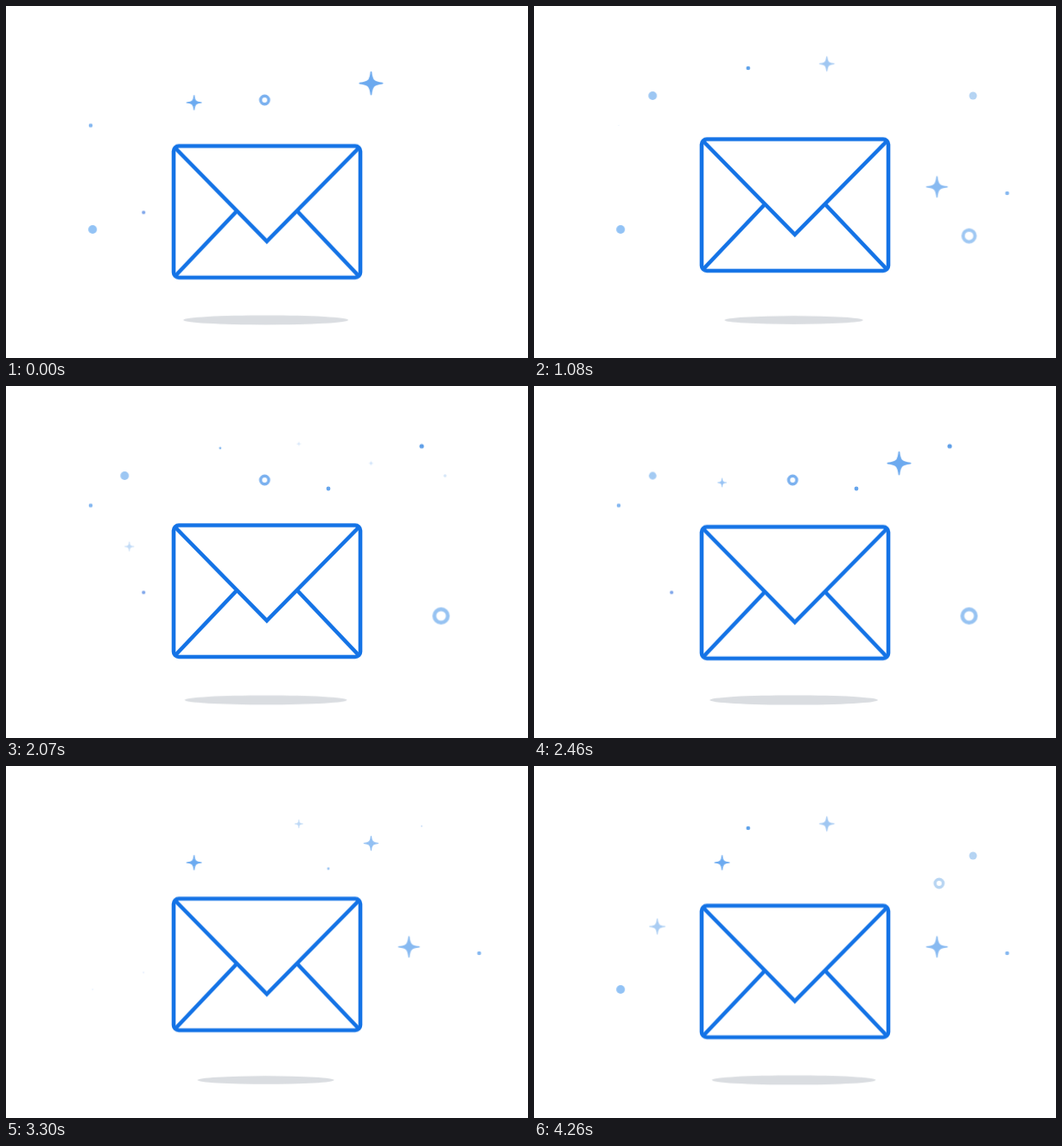
Animation of 604x408 px, one loop 4.29 s. Source, as an HTML page without scripts:

```html
<!DOCTYPE html>
<html lang="en">
<head>
<meta charset="utf-8">
<title>Floating envelope</title>
<style>
html, body { margin: 0; width: 100%; height: 100%; overflow: hidden; background: #fff; }
svg { display: block; width: 604px; height: 408px; }

/* Envelope and shadow share one bobbing rhythm */
.env, .shadow { animation: bob 1072.5ms cubic-bezier(.4, 0, .6, 1) -1903ms infinite alternate; }
.env { fill: none; stroke: #1473e6; stroke-width: 4.6; }
.shadow { animation-name: squeeze; fill: #dadde1; }
@keyframes bob { from { transform: translateY(.8px); } to { transform: translateY(-9.2px); } }
@keyframes squeeze { from { transform: scale(1); } to { transform: scale(.8, .84); } }

/* Sparkles: each pops in and out on its own schedule */
.p { animation: 4290ms linear infinite; fill: var(--c); }
.star { stroke: var(--c); stroke-width: .12; stroke-linejoin: round; }
.ring { fill: none; stroke: var(--c); }

@keyframes a { 0%, 18%, 37%, 68% { scale: 1; opacity: 1; } 27%, 30%, 76%, 100% { scale: 0; opacity: .3; } }
@keyframes b { 0%, 38%, 83%, 100% { scale: 1; opacity: 1; } 47%, 76% { scale: 0; opacity: .3; } }
@keyframes c { 0%, 10%, 43.5%, 72% { scale: 1; opacity: 1; } 17%, 39.5%, 79%, 100% { scale: 0; opacity: .3; } }
@keyframes d { 0%, 12%, 60%, 100% { scale: 1; opacity: 1; } 19%, 53.5% { scale: 0; opacity: .3; } }
@keyframes e { 0%, 14%, 37%, 68% { scale: 1; opacity: 1; } 21%, 30%, 75%, 100% { scale: 0; opacity: .3; } }
@keyframes f { 0%, 10%, 54%, 74% { scale: 1; opacity: 1; } 17%, 47%, 82%, 100% { scale: 0; opacity: .3; } }
@keyframes g { 0%, 12%, 52%, 92% { scale: 0; opacity: .3; } 18%, 46%, 98%, 100% { scale: 1; opacity: 1; } }
@keyframes h { 0%, 7%, 50%, 73% { scale: 0; opacity: .3; } 13%, 44%, 80%, 100% { scale: 1; opacity: 1; } }
@keyframes i { 0%, 7%, 65%, 100% { scale: 0; opacity: .3; } 13%, 56.5% { scale: 1; opacity: 1; } }
@keyframes j { 0%, 5%, 51%, 84.5% { scale: 0; opacity: .3; } 11%, 44%, 91%, 100% { scale: 1; opacity: 1; } }
@keyframes k { 0%, 13%, 36%, 60% { scale: 0; opacity: .3; } 19%, 29%, 68%, 100% { scale: 1; opacity: 1; } }
@keyframes m { 0%, 19%, 65.5%, 100% { scale: 0; opacity: .3; } 26%, 59% { scale: 1; opacity: 1; } }
@keyframes n { 0%, 28%, 79%, 100% { scale: 0; opacity: .3; } 35%, 72% { scale: 1; opacity: 1; } }
@keyframes o { 0%, 38.5%, 81%, 100% { scale: 0; opacity: .3; } 44.5%, 74% { scale: 1; opacity: 1; } }
@keyframes q { 0%, 32%, 52%, 91% { scale: 0; opacity: .3; } 38%, 46%, 97%, 100% { scale: 1; opacity: 1; } }
@keyframes r { 0%, 82% { scale: 0; opacity: .3; } 89%, 100% { scale: 1; opacity: 1; } }
</style>
</head>
<body>
<svg viewBox="0 0 604 408">
  <defs>
    <path id="star" d="M0-.95C.08-.22 .22-.08 .95 0C.22 .08 .08 .22 0 .95C-.08 .22-.22 .08-.95 0C-.22-.08-.08-.22 0-.95Z"/>
  </defs>

  <g transform="translate(300.6 364)"><ellipse class="shadow" rx="97.5" ry="5.6"/></g>

  <g class="env">
    <rect x="194" y="162.5" width="216" height="152.5" rx="6"/>
    <path d="M196 165L301.8 273L408 165M267 238L196 313M337 238L408 313"/>
  </g>

  <!-- dots -->
  <g transform="translate(98 138.5)"><circle class="p" r="2.3" style="--c:#86b8f0;animation-name:a"/></g>
  <g transform="translate(100.2 259)"><circle class="p" r="5" style="--c:#93c3f5;animation-name:b"/></g>
  <g transform="translate(159.2 239.3)"><circle class="p" r="2.1" style="--c:#7fa6ea;animation-name:c"/></g>
  <g transform="translate(247.8 72)"><circle class="p" r="2.3" style="--c:#5fa2ea;animation-name:g"/></g>
  <g transform="translate(137.3 104)"><circle class="p" r="4.9" style="--c:#9dc7f3;animation-name:i"/></g>
  <g transform="translate(508 104)"><circle class="p" r="4.5" style="--c:#b5d4f3;animation-name:j"/></g>
  <g transform="translate(547.5 217)"><circle class="p" r="2.3" style="--c:#86b8f0;animation-name:k"/></g>
  <g transform="translate(481 69.7)"><circle class="p" r="2.6" style="--c:#5f9fe8;animation-name:n"/></g>
  <g transform="translate(373 119)"><circle class="p" r="2.4" style="--c:#66a5ec;animation-name:o"/></g>

  <!-- rings -->
  <g transform="translate(299.3 109)"><circle class="p ring" r="4.7" stroke-width="3.5" style="--c:#7bb1ef;animation-name:e"/></g>
  <g transform="translate(503.4 266.5)"><circle class="p ring" r="7.8" stroke-width="4.4" style="--c:#97c3f2;animation-name:m"/></g>
  <g transform="translate(468.7 136)"><circle class="p ring" r="4.7" stroke-width="3.5" style="--c:#b8d5f2;animation-name:r"/></g>

  <!-- stars -->
  <g transform="translate(217.6 112) scale(9)"><use href="#star" class="p star" style="--c:#6dabf0;animation-name:d"/></g>
  <g transform="translate(422.4 89.5) scale(13.8)"><use href="#star" class="p star" style="--c:#6daaef;animation-name:f"/></g>
  <g transform="translate(338.8 67) scale(8.8)"><use href="#star" class="p star" style="--c:#a0c7f2;animation-name:h"/></g>
  <g transform="translate(466.2 209.6) scale(12.4)"><use href="#star" class="p star" style="--c:#88baf1;animation-name:k"/></g>
  <g transform="translate(142.7 186) scale(9.2)"><use href="#star" class="p star" style="--c:#aacdf3;animation-name:q"/></g>
</svg>
</body>
</html>
```
